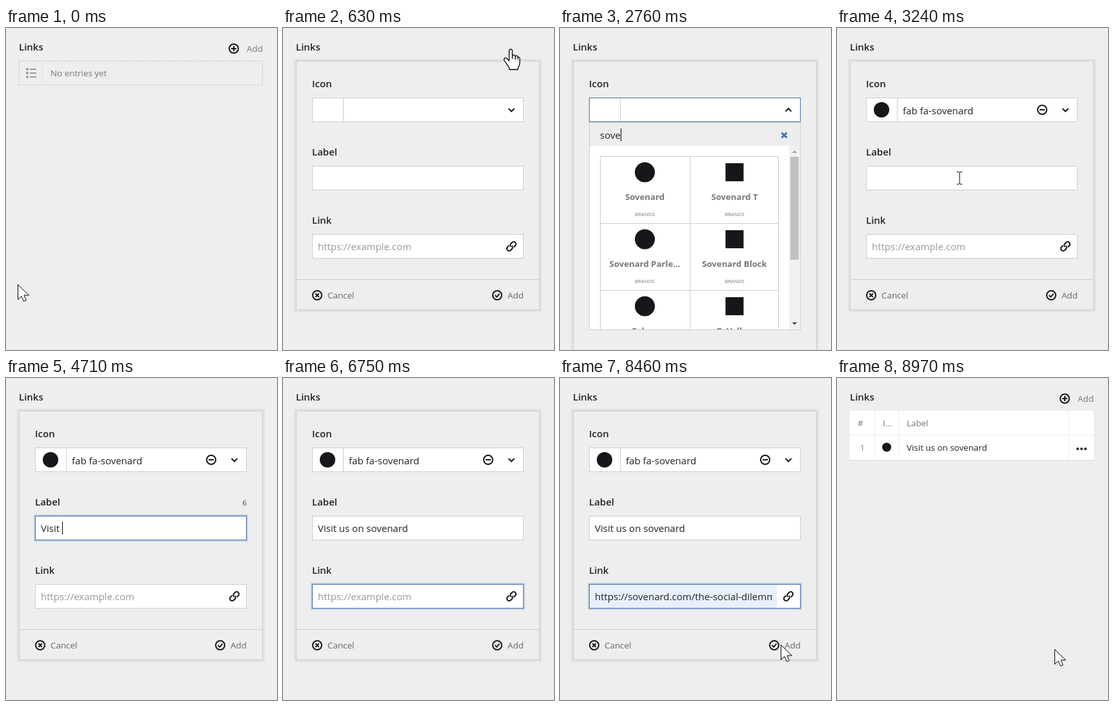
An HTML page that plays this animation: 420x500 px, repeating every 9000 ms.

```html
<!DOCTYPE html>
<html lang="en">
<head>
<meta charset="utf-8">
<title>Links field</title>
<style>
  html, body { margin: 0; width: 100%; height: 100%; overflow: hidden; background: #eee; }
  svg { display: block; width: 100vw; height: 100vh; }
  text { font: 15px "Open Sans", "Noto Sans", sans-serif; fill: #222; white-space: pre; }
  .head { font-weight: 600; }
  .small { font-size: 13.4px; }
  .gray { fill: #777; }
  .mid { fill: #666; }
  .hint { fill: #999; }
  .tag { font-size: 7.8px; fill: #777; text-anchor: middle; }
  .name { font-size: 13.2px; font-weight: 700; fill: #777; text-anchor: middle; }
  .count { font-size: 11.5px; text-anchor: end; fill: #444; }
  .box { fill: #fff; stroke: #ccc; }
  .focus { stroke: #4271ae; }
  .ring { fill: none; stroke: #4271ae; stroke-opacity: .25; stroke-width: 2; }
  .line { fill: none; stroke: #ccc; }
  .icon { fill: none; stroke: #16171a; stroke-width: 2; }
  .dark { fill: #16171a; }
  .pointer { fill: #fff; stroke: #000; stroke-linejoin: round; }
</style>
</head>
<body>
<svg viewBox="0 0 420 500">
  <defs>
    <clipPath id="urlClip"><rect x="46" y="321" width="283" height="36"/></clipPath>
    <clipPath id="listClip"><rect x="46" y="183" width="309" height="285"/></clipPath>
    <circle id="ringIcon" r="7"/>
  </defs>
  <rect width="420" height="500" fill="#eee"/>
  <text class="head" x="20" y="35">Links</text>

  <g id="addTop">
    <g class="icon" transform="translate(353 32)"><use href="#ringIcon"/><path d="M-4 0H4M0-4V4"/></g>
    <text class="small gray" x="373" y="37">Add</text>
  </g>

  <g id="empty">
    <rect x="20.5" y="51.5" width="377" height="37" fill="none" stroke="#c4c4c4" stroke-dasharray="3 2"/>
    <path d="M56.5 52V88" stroke="#e2e2e2"/>
    <path d="M37 64H47M37 70H47M37 76H47" stroke="#999" stroke-width="2"/>
    <g fill="#999"><circle cx="33" cy="64" r="2"/><circle cx="33" cy="70" r="2"/><circle cx="33" cy="76" r="2"/></g>
    <text class="small gray" x="69" y="75">No entries yet</text>
  </g>

  <g id="form">
    <rect id="ringBox" x="18.5" y="49.5" width="381" fill="none" stroke="#000" stroke-opacity=".05" stroke-width="3"/>
    <rect id="formBox" class="line" x="20.5" y="51.5" width="377"/>
    <text class="head" x="45" y="92">Icon</text>
    <rect id="iconBox" class="box" x="45.5" y="108.5" width="327" height="37"/>
    <path class="line" d="M93.5 109V145"/>
    <path id="chevron" class="icon"/>
    <g id="picked">
      <circle class="dark" cx="69" cy="127" r="12"/>
      <text x="102" y="134">fab fa-sovenard</text>
      <g class="icon" transform="translate(318 127)"><use href="#ringIcon"/><path d="M-4 0H4"/></g>
    </g>

    <g id="fields">
      <text class="head" x="45" y="198">Label</text>
      <text id="count" class="count" x="373" y="198"></text>
      <rect id="labelRing" class="ring" x="44" y="213" width="330" height="40"/>
      <rect id="labelBox" class="box" x="45.5" y="214.5" width="327" height="37"/>
      <text id="label" x="54" y="239"></text>

      <text class="head" x="45" y="304">Link</text>
      <rect id="linkRing" class="ring" x="44" y="319" width="330" height="40"/>
      <rect id="linkBox" class="box" x="45.5" y="320.5" width="327" height="37"/>
      <text id="linkHint" class="hint" x="54" y="345">https://example.com</text>
      <g id="url">
        <rect x="46" y="321" width="290" height="36" fill="#e8f0fe"/>
        <text x="54" y="345" clip-path="url(#urlClip)">https://sovenard.com/the-social-dilemma</text>
      </g>
      <g class="icon" transform="translate(354 339) rotate(-45)">
        <path d="M-1.5 -3.5H-5A3.5 3.5 0 0 0 -5 3.5H-2.5A3.5 3.5 0 0 0 1 0M1.5 3.5H5A3.5 3.5 0 0 0 5 -3.5H2.5A3.5 3.5 0 0 0 -1 0"/>
      </g>
      <path class="line" d="M21 390.5H397"/>
      <g class="icon" transform="translate(53 415)"><use href="#ringIcon"/><path d="M-2.7-2.7L2.7 2.7M2.7-2.7L-2.7 2.7"/></g>
      <text class="small mid" x="69" y="420">Cancel</text>
      <g class="icon" transform="translate(332 415)"><use href="#ringIcon"/><path d="M-3.5 0L-.8 2.6L3.6-2.4"/></g>
      <text class="small mid" x="348" y="420">Add</text>
    </g>

    <g id="drop">
      <rect class="box" x="45.5" y="146.5" width="327" height="322"/>
      <rect x="46" y="147" width="326" height="36" fill="#ededed"/>
      <path d="M45 145.5H373" stroke="#4271ae"/>
      <text id="searchHint" class="hint" x="62" y="172">Search ...</text>
      <text id="search" x="62" y="172"></text>
      <path id="clear" d="M343.5 162.5L351.5 170.5M351.5 162.5L343.5 170.5" stroke="#4271ae" stroke-width="3"/>
      <g clip-path="url(#listClip)"><g id="all"></g><g id="found"></g></g>
      <rect x="355" y="183" width="17" height="285" fill="#f1f1f1"/>
      <rect id="thumb" x="357" y="200" width="13" fill="#c1c1c1"/>
      <path d="M359.5 194H367.5L363.5 190Z" fill="#a3a3a3"/>
      <path d="M359.5 457H367.5L363.5 461Z" fill="#505050"/>
    </g>
    <rect id="caret" width="1" height="20" fill="#000"/>
  </g>

  <g id="table">
    <rect x="20" y="52" width="378" height="77" fill="#000" opacity=".04"/>
    <rect x="20" y="51" width="378" height="76" fill="#fff"/>
    <path d="M20 88.5H398M58.5 51V127M95.5 51V127M359.5 51V127" stroke="#eee"/>
    <text class="small gray" x="32" y="75">#</text>
    <text class="small gray" x="71" y="75">I...</text>
    <text class="small gray" x="108" y="75">Label</text>
    <text class="gray" style="font-size:12px" x="36" y="113">1</text>
    <text class="small" x="108" y="113">Visit us on sovenard</text>
    <g class="dark">
      <circle cx="77" cy="107.5" r="7"/>
      <circle cx="373" cy="110" r="2"/><circle cx="379" cy="110" r="2"/><circle cx="385" cy="110" r="2"/>
    </g>
  </g>

  <g id="cursor">
    <path id="arrow" class="pointer" d="M.5 .5V23.5L6 18.5L9.5 26.3L13.3 24.7L10 17H17.5Z"/>
    <path id="hand" class="pointer" stroke-width="1.3" d="M-2.5 17V1.2C-2.5-2 2.4-2 2.4 1.2V9.5C3.5 7 7 7.3 7 10.3C8.3 8.3 11 9 11 11.5C12.5 10.5 14 11.7 14 13.5V20C14 25 11 26 11 30.5H-2C-2 26-5 24-10 16.5C-11.5 13.5-8.5 11-6 13.5ZM2.4 9.5V14M7 10.3V15M11 11.5V15"/>
    <path id="beam" d="M-4-9.5H-1L0-8.5L1-9.5H4M0-9V9M-4 9.5H-1L0 8.5L1 9.5H4" fill="none" stroke="#000"/>
  </g>
</svg>
<script>
const LOOP = 9000, STEP = 30, BLINK = 530;
const $ = id => document.getElementById(id);
const show = (id, on) => { $(id).style.display = on ? "" : "none"; };

// Moments of the story, in ms
const AT = { form: 600, drop: 1260, search: 1480, filter: 2440, pick: 3000,
  label: 3570, link: 6450, fill: 7140, save: 8600 };

// start, gap between keys, text
const searchKeys = [[2280, 80, "sove"]];
const labelKeys = [[4290, 78, "Visit "], [4830, 66, "us on "], [5340, 48, "sovenard"]];

// time, x, y, pointer shown from then on
const path = [
  [0, 18, 398, "arrow"], [30, 18, 398, "arrow"], [560, 353, 34, "hand"],
  [640, 353, 34, "arrow"], [930, 348, 123, "hand"], [960, 348, 123, "hand"],
  [1080, 360, 124, "hand"], [1290, 360, 124, "hand"], [1640, 290, 166, "beam"],
  [2280, 290, 166, ""], [2790, 290, 166, "arrow"], [2960, 140, 232, "hand"],
  [3000, 140, 232, "beam"], [3240, 190, 233, "beam"], [3840, 190, 233, "beam"],
  [4170, 215, 306, "arrow"], [4290, 215, 306, ""], [6870, 88, 389, "arrow"],
  [7080, 88, 392, "arrow"], [7440, 117, 378, "arrow"], [7710, 120, 381, "arrow"],
  [7860, 120, 381, "arrow"], [7890, 126, 385, "arrow"], [8130, 126, 385, "arrow"],
  [8490, 346, 415, "hand"], [8600, 346, 415, "arrow"], [8790, 348, 443, "arrow"],
  [8960, 337, 421, "arrow"]
];

function fillList(id, items) {
  $(id).innerHTML = items.map(([name, shape], i) => {
    const x = 62 + i % 2 * 139, y = 199 + Math.floor(i / 2) * 104, mid = x + 69.5;
    const mark = shape === "o"
      ? `<circle class="dark" cx="${mid}" cy="${y + 25}" r="15.5"/>`
      : `<rect class="dark" x="${mid - 14}" y="${y + 11}" width="28" height="28"/>`;
    return `<rect class="box" x="${x + .5}" y="${y + .5}" width="${i % 2 ? 137 : 139}" height="104"/>${mark}
      <text class="name" x="${mid}" y="${y + 68}">${name}</text>
      <text class="tag" x="${mid}" y="${y + 93}">BRANDS</text>`;
  }).join("");
}
fillList("all", [["730qm", "o"], ["Obtainable Sign", "o"], ["Ordelisk", "s"],
  ["Velquorians Ltd...", "s"], ["Ovu.net", "o"], ["Alverdan", "s"]]);
fillList("found", [["Sovenard", "o"], ["Sovenard T", "s"], ["Sovenard Parle...", "o"],
  ["Sovenard Block", "s"], ["Felmo", "o"], ["OrVellon", "s"]]);

function typed(keys, t, focusTime) {
  let text = "", last = focusTime;
  for (const [start, gap, part] of keys) {
    if (t < start) break;
    const n = Math.min(part.length, Math.floor((t - start) / gap) + 1);
    text += part.slice(0, n);
    last = start + (n - 1) * gap;
  }
  return { text, on: (t - last) % (2 * BLINK) < BLINK };
}

function drawCursor(t) {
  let i = path.length - 1;
  while (path[i][0] > t) i--;
  const [t0, x0, y0, kind] = path[i];
  const [t1, x1, y1] = path[i + 1] || [t0 + 1, x0, y0];
  const p = Math.min(1, (t - t0) / (t1 - t0)), e = p * p * (3 - 2 * p);
  $("cursor").setAttribute("transform",
    `translate(${Math.round(x0 + (x1 - x0) * e)} ${Math.round(y0 + (y1 - y0) * e)})`);
  for (const k of ["arrow", "hand", "beam"]) show(k, k === kind);
}

function placeCaret(id, top, on) {
  const x = 1 + +$(id).getAttribute("x") + $(id).getComputedTextLength();
  $("caret").setAttribute("x", Math.floor(x));
  $("caret").setAttribute("y", top);
  show("caret", on);
}

function draw(t) {
  const within = (a, b) => t >= a && t < b;
  const form = within(AT.form, AT.save), drop = within(AT.drop, AT.pick);
  const onLabel = within(AT.label, AT.link), onLink = within(AT.link, AT.save);
  const filled = t >= AT.fill, filtered = t >= AT.filter;
  const search = typed(searchKeys, t, AT.search), label = typed(labelKeys, t, AT.label);

  show("addTop", !form);
  show("empty", t < AT.form);
  show("form", form);
  show("table", t >= AT.save);
  show("fields", !drop);
  show("drop", drop);
  show("picked", t >= AT.pick);
  $("ringBox").setAttribute("height", drop ? 600 : 390);
  $("formBox").setAttribute("height", drop ? 600 : 386);
  $("iconBox").classList.toggle("focus", drop);
  $("chevron").setAttribute("d", drop ? "M349.5 129.5L354 125L358.5 129.5" : "M349.5 125L354 129.5L358.5 125");

  $("search").textContent = search.text;
  show("searchHint", !search.text);
  show("clear", search.text);
  show("all", !filtered);
  show("found", filtered);
  $("thumb").setAttribute("height", filtered ? 160 : 17);

  $("label").textContent = label.text;
  $("count").textContent = onLabel ? label.text.length : "";
  show("labelRing", onLabel);
  $("labelBox").classList.toggle("focus", onLabel);

  show("linkRing", onLink);
  $("linkBox").classList.toggle("focus", onLink);
  show("linkHint", !filled);
  show("url", filled);

  if (drop) placeCaret("search", 156, t >= AT.search && search.on);
  else placeCaret("label", 223, onLabel && label.on);
  drawCursor(t);
}

const start = performance.now();
function tick() {
  const t = (performance.now() - start) % LOOP;
  draw(t - t % STEP);
  requestAnimationFrame(tick);
}
tick();
</script>
</body>
</html>
```
